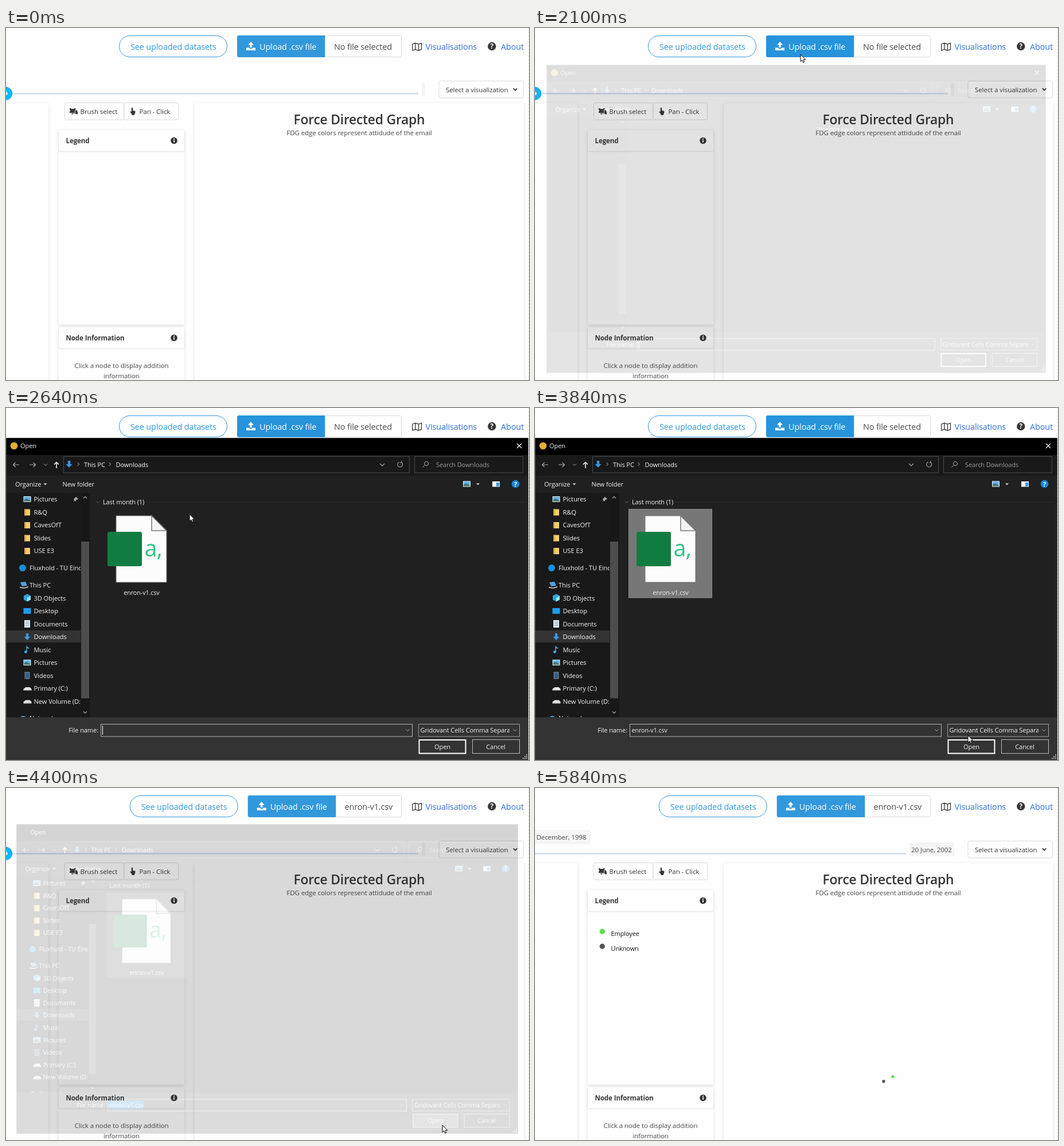
Write an HTML page that moves like this. It is 912x614 px and loops after 6900 ms.

```html
<!DOCTYPE html>
<html lang="en">
<head>
<meta charset="utf-8">
<title>Dataset upload</title>
<style>
html, body { margin: 0; width: 100%; height: 100%; overflow: hidden; background: #fefefe; }
svg { display: block; width: 912px; height: 614px; }
text { font-family: "Open Sans", "Noto Sans", sans-serif; letter-spacing: -.01em; white-space: pre; }
.card { fill: #fefefe; filter: drop-shadow(0 2px 3px rgba(10,10,10,.11)); }
.head { fill: #fefefe; filter: drop-shadow(0 1px 1px rgba(10,10,10,.12)); }
</style>
</head>
<body>
<svg id="stage" viewBox="0 0 912 614"></svg>
<script>
const LOOP = 6900;
const DARK = '#363636', GREY = '#4a4a4a', BLUE = '#3298dc', LINK = '#3273dc';

// Drawing helpers
const text = (x, y, size, fill, str, attrs = '') =>
  `<text x="${x}" y="${y}" font-size="${size * .965}" fill="${fill}" ${attrs}>${str}</text>`;
const rect = (x, y, w, h, fill, attrs = '') =>
  `<rect x="${x}" y="${y}" width="${w}" height="${h}" fill="${fill}" ${attrs}/>`;
const box = (x, y, w, h, stroke, fill = 'none', rx = 0) =>
  rect(x, y, w, h, fill, `stroke="${stroke}" rx="${rx}"`);
const circle = (x, y, r, fill, attrs = '') => `<circle cx="${x}" cy="${y}" r="${r}" fill="${fill}" ${attrs}/>`;
const fill = (d, color) => `<path d="${d}" fill="${color}"/>`;
const line = (d, color, w = 1) => `<path d="${d}" fill="none" stroke="${color}" stroke-width="${w}"/>`;
const at = (x, y, body) => `<g transform="translate(${x} ${y})">${body}</g>`;
const group = (id, body) => `<g id="${id}">${body}</g>`;
const middle = 'text-anchor="middle"', bold = 'font-weight="700"';

const chevron = (x, y, color, w = 1, s = 3) => line(`M${x - s} ${y - s / 2}l${s} ${s}l${s} ${-s}`, color, w);
const chevronUp = (x, y, color) => line(`M${x - 3} ${y + 1.5}l3 -3l3 3`, color, 1.2);
const chevronRight = (x, y) => line(`M${x - 1.5} ${y - 3}l3 3l-3 3`, '#bbb');
const caret = (x, y) => fill(`M${x - 3} ${y - 1.5}h6l-3 3z`, '#ddd');
const info = (x, y) => circle(x, y, 5.8, DARK) + rect(x - .9, y - 1, 1.8, 4, '#fff') + circle(x, y - 2.8, 1.1, '#fff');

const handPath = 'M3 1.2a1.4 1.4 0 0 1 2.8 0V6l3.4 .8q1.5 .4 1.4 2l-.6 3.4l-1 1.3v2.3H4V14L.5 9.6q-1 -1.6 .5 -2L3 9z';
const downArrow = (x, y) => fill(`M${x - 2.2} ${y - 6}h4.4v6h3.4l-5.6 6l-5.6 -6h3.4z`, '#3a96e0');

// Web page
function page() {
  const uploadIcon = at(419, 24, fill('M8 0l5 5.5h-3.2V10H6.2V5.5H3zM0 10.5h5l1.2 1.5h3.6l1.2 -1.5h5V15H0z', '#fff'));
  const mapIcon = at(708, 25.5, line('M.8 2.5L5.8 .8L11.5 2.5L16.5 .8V12L11.5 13.7L5.8 12L.8 13.7zM5.8 .8V12M11.5 2.5V13.7', DARK, 1.3));
  const brushIcon = at(111, 140, fill('M0 0h2.5v1H8V0h2.5v2.5h-1v1H13v2h1v5h-2.5v-1H6v1H3.5V8H0V5.5h1v-3H0z', DARK) +
    line('M4 8.6h5.4V4', '#fff', .8));
  const card = (y, h, title) => `<rect class="card" x="92" y="${y}" width="219" height="${h}"/>` +
    `<rect class="head" x="92" y="${y}" width="219" height="36.5"/>` +
    text(104.5, y + 23, 12, DARK, title, bold) + info(293, y + 18.5);
  return rect(0, 0, 912, 614, '#fefefe') +
    `<path d="M911.5 0V614" stroke="#e2e2e2" stroke-dasharray="3 3"/>` +
    group('actions',
      box(197.5, 13.5, 188, 37, BLUE, '#fff', 18.5) + text(217, 38.3, 15, BLUE, 'See uploaded datasets') +
      `<path id="upload" d="M557 13H406a3 3 0 0 0 -3 3V48a3 3 0 0 0 3 3H557z"/>` +
      uploadIcon + text(442, 38.3, 15, '#fff', 'Upload .csv file')) +
    `<path id="fileBox" fill="#fff" stroke="#dbdbdb"/>` +
    group('noFile', text(572, 38.3, 15, GREY, 'No file selected')) +
    group('hasFile', text(590.5, 38.3, 15, GREY, 'enron-v1.csv')) +
    mapIcon + text(731.5, 38.3, 15, LINK, 'Visualisations') +
    circle(847.3, 32, 7.2, DARK) + text(847.3, 36.3, 12, '#fff', '?', middle + bold) +
    text(863, 38.3, 15, LINK, 'About') +

    group('emptySlider', rect(0, 113, 719, 3, '#d8e0f3') + circle(-.5, 114.3, 11.7, '#12b3f7') +
      circle(0, 114.3, 2.8, '#fff') + rect(725, 96, 6, 23, '#f4f4f4', 'rx="2"')) +
    group('datedSlider', rect(0, 113, 647, 3, '#d8e0f3') + rect(-6, 73, 103, 25, '#f5f5f5', 'rx="3"') +
      text(2.5, 90, 12, GREY, 'December, 1998') + rect(653, 95, 78, 24, '#f5f5f5', 'rx="3"') +
      text(656, 111.5, 12, GREY, '20 June, 2002')) +
    box(755, 92.5, 147.5, 29.5, '#dbdbdb', '#fff', 3) + text(767, 111.8, 12, DARK, 'Select a visualization') +
    chevron(888, 107, DARK, 1.8, 3.3) +

    `<rect class="card" x="-10" y="131" width="84" height="500"/>` +
    `<rect class="card" x="329" y="131" width="574" height="500"/>` +
    box(102.5, 130.5, 103, 29.5, '#dbdbdb', '#fff', 2) + brushIcon + text(129.5, 150, 12, DARK, 'Brush select') +
    box(206, 130.5, 94.5, 29.5, '#dbdbdb', '#fff', 2) +
    at(216, 139, `<path d="${handPath}" fill="${DARK}" transform="scale(.9 .82)"/>`) +
    text(232.5, 150, 12, DARK, 'Pan - Click') +
    card(178, 339, 'Legend') + card(522, 120, 'Node Information') +
    text(201.5, 593, 12, GREY, 'Click a node to display addition', middle) +
    text(201.5, 611, 12, GREY, 'information', middle) +
    text(616, 168, 23.7, DARK, 'Force Directed Graph', middle + ' font-weight="600"') +
    text(616, 187.3, 12, GREY, 'FDG edge colors represent attidude of the email', middle) +
    group('graph',
      circle(117.3, 250.3, 4.7, '#62de55') + text(132.5, 258, 11.4, '#111', 'Employee') +
      circle(117.3, 276.3, 4.7, '#555') + text(132.5, 284, 11.4, '#111', 'Unknown') +
      circle(608, 511.7, 2.7, '#555') + circle(624, 503.6, 2.7, '#62de55'));
}

// Small icons of the folder tree, centred on 0,0
const icons = {
  folder: rect(-5, -5, 10, 11, '#f3cf6c') + rect(-5, -5, 3, 11, '#dcae45'),
  cloud: circle(-8, 0, 6, '#1490df'),
  pc: fill('M-12 -5l9 -1l3 7l-9 1z', '#4aa3df') + line('M-13 4l8 1l7 -2', '#ddd', 1.5),
  cube: fill('M0 -7l6 3v7l-6 3l-6 -3v-7z', '#2ba8dc') + fill('M0 0l6 -4v7l-6 3z', '#a5e3f5'),
  desktop: rect(-6.5, -5, 13, 10, '#1e9bea'),
  page: rect(-5, -6.5, 10, 13, '#e4eaee') + line('M-3 -3h6M-3 0h6M-3 3h6', '#5c9ccc'),
  down: downArrow(0, 0),
  note: line('M-1 4V-6q1 3 4 4', '#3aa5e8', 1.6) + circle(-2.6, 4, 2.4, '#3aa5e8'),
  picture: rect(-6.5, -5, 13, 10, '#e9f1f6') + rect(-5.5, -4, 11, 5, '#5db1e8') + fill('M-5.5 4V1l4 -2l7 3v2z', '#477'),
  film: rect(-5, -6, 10, 12, '#8ba6bd') + rect(-3, -5, 6, 10, '#345b84') + line('M-4.2 -6V6M4.2 -6V6', '#222', 1),
  drive: fill('M-6.5 1l4 -3h7l3 3v3h-14z', '#dfe3e6') + line('M-6 3.5h13', '#888', 1),
  globe: circle(-7, 2, 6, '#4aa9e6')
};

function sidebar() {
  const rows = [
    [159, 'picture', 'Pictures'], [181.5, 'folder', 'R&amp;Q'], [204, 'folder', 'CavesOfT'],
    [226.5, 'folder', 'Slides'], [249, 'folder', 'USE E3'], [279, 'cloud', 'Fluxhold - TU Eindhoven'],
    [309, 'pc', 'This PC'], [331.5, 'cube', '3D Objects'], [354, 'desktop', 'Desktop'],
    [376.5, 'page', 'Documents'], [399, 'down', 'Downloads'], [421.5, 'note', 'Music'],
    [444, 'picture', 'Pictures'], [466.5, 'film', 'Videos'], [489, 'drive', 'Primary (C:)'],
    [511.5, 'drive', 'New Volume (D:)'], [541, 'globe', 'Network']];
  const outer = ['cloud', 'pc', 'globe'];
  return `<clipPath id="tree"><path d="M0 148H130V539H0z"/></clipPath><g clip-path="url(#tree)">` +
    rect(1, 388, 129, 21, '#333') +
    rows.map(([y, icon, name]) => at(37, y, icons[icon]) +
      text(outer.includes(icon) ? 41 : 48.5, y + 4.2, 11.6, '#f2f2f2', name)).join('') +
    fill('M118 159l4 -4l4 4l-3 1l-2 3l-1.5 -1.5l-2.5 2.5l2 -3z', '#aaa') + '</g>';
}

// File dialog
function dialog() {
  const white = (x, y, str, attrs) => text(x, y, 11.5, '#f2f2f2', str, attrs);
  return rect(0, 52, 911, 562, '#202020') + rect(0, 52, 911, 30, '#000') + rect(0, 82, 911, 36, '#191919') +
    rect(0, 148, 147, 391.5, '#191919') + rect(0, 539.5, 911, 74.5, '#333') +
    white(25, 70.3, 'Open') +
    group('titleIcons', circle(14, 66, 6.3, '#e3ad35') + line('M891 62l8 8m0 -8l-8 8', '#fff', 1.2)) +
    line('M23 99H12.5m4 -4l-4 4l4 4', '#aaa', 1.2) + line('M41 99h10.5m-4 -4l4 4l-4 4', '#aaa', 1.2) +
    chevron(69, 99, '#aaa') + line('M88 105V94.5m-4 4l4 -4l4 4', '#fff', 1.5) +
    box(100.5, 84.5, 603, 28.5, '#4d4d4d') + downArrow(110, 98) +
    chevronRight(126, 98) + white(136, 102.5, 'This PC') + chevronRight(181, 98) + white(191.5, 102.5, 'Downloads') +
    chevron(656, 99, '#aaa', 1.2, 4) + line('M690 95a4.5 4.5 0 1 1 -4.5 -.7m4.5 -2v3h-3', '#aaa', 1.1) +
    box(712.5, 84.5, 189, 28.5, '#4d4d4d') +
    circle(733, 97, 3.5, 'none', 'stroke="#aaa"') + line('M730.5 99.5l-4 4', '#aaa') +
    text(750, 102.5, 11.4, '#999', 'Search Downloads') +
    white(16, 137, 'Organize') + caret(68.5, 133) + white(98.5, 137, 'New folder') +
    at(803.5, 132.5, icons.picture) + caret(823, 133) +
    rect(848, 128, 13, 9.5, '#f2f2f2') + rect(855, 130, 5, 6.5, '#2f9be0') +
    circle(888.5, 132.5, 6.8, '#1b84d8') + text(888.5, 136.6, 11, '#fff', '?', middle + bold) +

    rect(131, 148, 14.5, 391, '#171717') + rect(131, 233, 14, 273.5, '#4d4d4d') +
    chevronUp(138, 156, '#aaa') + chevron(138, 531, '#aaa', 1.2) +
    group('working', white(530.5, 173.5, 'Working on it...', middle)) +
    group('loaded', sidebar() + chevron(160, 164, '#666') + text(169, 167.8, 11.4, '#f2f2f2', 'Last month (1)') +
      line('M246 164.5H904', '#2d2d2d') +
      `<rect id="tile" x="163.5" y="176.5" width="145" height="154.5"/>` +
      `<path d="M192 188H254L280 214V304H192z" fill="#fcfcfc" stroke="#777"/>` +
      `<path d="M254 188V214H280z" fill="#f4f4f4" stroke="#777" stroke-width="1.5"/>` +
      text(241.5, 258.5, 41, '#34c383', 'a,') + rect(177, 216, 60, 60, '#117c41', 'rx="3"') +
      text(236.5, 325.5, 11.2, '#f2f2f2', 'enron-v1.csv', middle)) +

    white(161, 566.2, 'File name:', 'text-anchor="end"') + box(165.5, 551.5, 543, 21.5, '#b5b5b5', '#333') +
    chevron(700.5, 562, '#aaa') + group('inputCaret', line('M168.5 554V570', '#fff')) +
    group('inputMark', rect(167, 554.5, 64, 15, '#0078d7')) +
    group('inputText', text(168.5, 566, 11.2, '#f2f2f2', 'enron-v1.csv')) +
    box(719.5, 551.5, 176, 21.5, '#a0a0a0', '#333') + chevron(887.5, 562, '#aaa') +
    '<clipPath id="combo"><path d="M720 552H878V573H720z"/></clipPath>' +
    `<g clip-path="url(#combo)">${white(722.5, 566.2, 'Gridovant Cells Comma Separated')}</g>` +
    `<rect id="openButton" x="720.5" y="579" width="81" height="23.5" stroke-width="2"/>` +
    white(761, 594.8, 'Open', middle) + box(813.5, 578.5, 82, 24, '#bbb', '#333') + white(854, 594.8, 'Cancel', middle) +
    [0, 1, 2].map(i => [0, 1, 2].slice(0, i + 1).map(j =>
      rect(907 - 3 * j, 604 + 3 * i, 2, 2, '#aaa')).join('')).join('') +
    box(.5, 52.5, 910, 561, '#3c3c3c');
}

const outline = 'fill="#fff" stroke="#000" stroke-width="1" stroke-linejoin="round"';
document.getElementById('stage').innerHTML = page() + group('dialog', dialog()) +
  group('cursor',
    `<path id="arrow" d="M0 0V12.5L2.9 9.9L4.8 14.2L6.8 13.3L4.9 9.2H8.7z" ${outline}/>` +
    `<path id="hand" d="${handPath}" transform="translate(-3.5 .5)" ${outline}/>`);

const el = id => document.getElementById(id);
const show = (id, on) => el(id).setAttribute('visibility', on ? 'inherit' : 'hidden');
const paint = (id, fill, stroke) => {
  el(id).setAttribute('fill', fill);
  el(id).setAttribute('stroke', stroke);
};

// Dialog poses: start time, opacity, scale
const poses = [[0, 0, 1], [2100, .12, .955], [2170, .45, .975], [2240, .82, .991], [2310, .95, .998], [2380, 1, 1],
  [4260, .85, .992], [4330, .5, .975], [4400, .16, .96], [4470, 0, 1]];

// Pointer path: time, x, y
const path = [[1140, 72, 140], [1430, 450.5, 31], [1570, 450.5, 31], [1830, 463, 46], [2310, 463, 46],
  [2640, 320, 185], [2710, 320, 185], [2960, 262, 256], [3150, 262, 256], [3350, 408, 295], [3420, 420, 304],
  [3840, 755, 571], [3910, 755, 571], [4050, 761, 588], [4880, 761, 588], [5500, 760, 555],
  [5630, 760, 555], [5840, 731, 594]];

function pointer(t) {
  const i = path.findIndex(key => key[0] > t);
  if (i < 1) return null;
  const [t0, x0, y0] = path[i - 1], [t1, x1, y1] = path[i];
  const u = (t - t0) / (t1 - t0), e = u * u * (3 - 2 * u);
  return [x0 + (x1 - x0) * e, y0 + (y1 - y0) * e];
}

function draw(t) {
  const picked = t >= 4330, parsed = t >= 4600, loaded = t >= 2450, selected = t >= 3080, closing = t >= 4260;
  const p = pointer(t);

  const split = picked ? 575.5 : 556.5;
  el('actions').setAttribute('transform', `translate(${picked ? 18.7 : 0} 0)`);
  el('fileBox').setAttribute('d', `M${split} 13.5H686.5a3 3 0 0 1 3 3V47.5a3 3 0 0 1 -3 3H${split}z`);
  show('noFile', !picked);
  show('hasFile', picked);
  show('emptySlider', !parsed);
  show('datedSlider', parsed);
  show('graph', parsed);

  const [, opacity, scale] = poses.filter(pose => pose[0] <= t).pop();
  el('dialog').setAttribute('opacity', opacity);
  el('dialog').setAttribute('transform', `translate(455 332.7) scale(${scale}) translate(-455 -332.7)`);
  show('titleIcons', !closing);
  show('working', !loaded);
  show('loaded', loaded);
  show('inputCaret', !selected);
  show('inputText', selected);
  show('inputMark', closing);
  const over = p && p[0] > 163 && p[0] < 309 && p[1] > 176 && p[1] < 331;
  if (closing) paint('tile', '#3c3c3c', 'none');
  else if (selected) paint('tile', '#777', '#888');
  else paint('tile', over ? '#4d4d4d' : 'none', 'none');
  paint('openButton', closing ? '#666' : t >= 3980 ? '#555' : '#333', closing ? '#999' : '#fff');

  const hand = p && t < 1960 && p[0] > 198 && p[0] < 689 && p[1] > 13 && p[1] < 51;
  const hovered = hand || (t >= 1960 && !picked);
  el('upload').setAttribute('fill', hovered ? '#2793da' : BLUE);
  show('cursor', p);
  show('arrow', !hand);
  show('hand', hand);
  if (p) el('cursor').setAttribute('transform', `translate(${p})`);
}

function tick() {
  draw(performance.now() % LOOP);
  requestAnimationFrame(tick);
}
tick();
</script>
</body>
</html>
```
